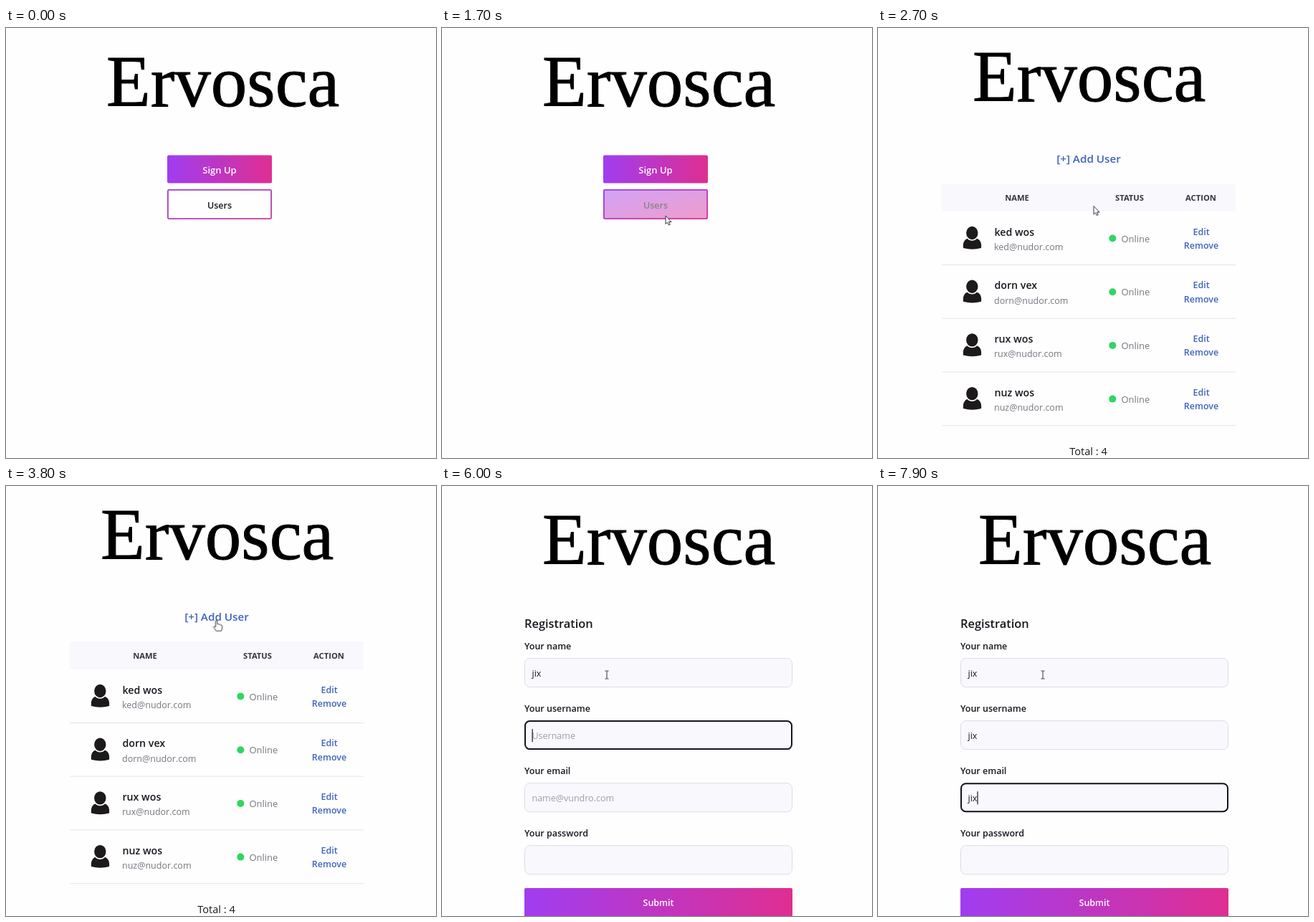
An HTML page that plays this animation: 600x600 px, repeating every 8000 ms.

```html
<!DOCTYPE html>
<html lang="en">
<head>
<meta charset="utf-8">
<title>Sign-up flow</title>
<style>
html, body { margin: 0; width: 100%; height: 100%; overflow: hidden; background: #fefefe; }
svg { display: block; width: 100vw; height: 100vh; }
text { font: 12.5px "Open Sans", "Noto Sans", sans-serif; fill: #17191f; white-space: pre; }
.mid { text-anchor: middle; }
.semi { font-weight: 600; }
.white { fill: #fff; }
.button { font-size: 13px; }
.title { font: 101px "Liberation Serif", "Noto Serif", serif; fill: #000; stroke: #000; stroke-width: .9px; }
.heading { font-size: 16.4px; font-weight: 600; }
.col { font-size: 11.2px; font-weight: 700; fill: #33363f; }
.person { font-size: 14.2px; font-weight: 600; }
.mail { fill: #74777f; }
.online { font-size: 12.9px; fill: #74777f; }
.link { font-weight: 600; fill: #3f62bd; }
.add { font-size: 15.2px; }
.total { font-size: 14.6px; }
.hint { fill: #9d9fa8; }

/* One loop is 8 s, so 1% is 80 ms. */
.home, .users, .form, .arrow, .hand, .beam { animation: home 8s step-end infinite; }
.users { animation-name: users; }
.form { animation-name: form; }
.arrow { animation-name: arrow; }
.hand { animation-name: hand; }
.beam { animation-name: beam; }
.hover { animation: hover 8s linear infinite; }
.cursor { animation: path 8s ease-in-out infinite; }
@keyframes home { 0% { opacity: 1 } 31.25%, 100% { opacity: 0 } }
@keyframes users { 0% { opacity: 0 } 31.25% { opacity: 1 } 58.75%, 100% { opacity: 0 } }
@keyframes form { 0% { opacity: 0 } 58.75%, 100% { opacity: 1 } }
@keyframes hover { 0%, 20.6% { opacity: 0 } 22%, 100% { opacity: 1 } }
@keyframes arrow {
  0% { opacity: 0 } 16.25% { opacity: 1 } 45% { opacity: 0 }
  58.75% { opacity: 1 } 63.5%, 100% { opacity: 0 }
}
@keyframes hand { 0% { opacity: 0 } 45% { opacity: 1 } 58.75%, 100% { opacity: 0 } }
@keyframes beam { 0% { opacity: 0 } 63.5%, 100% { opacity: 1 } }
@keyframes path {
  0%, 16.25% { transform: translate(296px, 302px) }
  21.25% { transform: translate(312px, 262px) }
  27.5%, 31.25% { transform: translate(319.5px, 244.5px) }
  33.75% { transform: translate(301px, 248.5px) }
  43.75% { transform: translate(294px, 191px) }
  50%, 60% { transform: translate(293.5px, 185.5px) }
  65%, 100% { transform: translate(230px, 263.5px) }
}
</style>
</head>
<body>
<svg viewBox="0 0 600 600">
  <defs>
    <linearGradient id="across">
      <stop stop-color="#a03df1"/><stop offset="1" stop-color="#df2e91"/>
    </linearGradient>
    <linearGradient id="diagonal" x2="1" y2="1">
      <stop stop-color="#a03df1"/><stop offset="1" stop-color="#df2e91"/>
    </linearGradient>
    <linearGradient id="edge" x2="1" y2="1">
      <stop stop-color="#9440d6"/><stop offset="1" stop-color="#c93a9c"/>
    </linearGradient>
    <g id="avatar" fill="#1d1a1b">
      <path d="M119 307C118 299 121 295 125.500 293.500Q131 298 137 293.500C142 295 145 299 144 307Q131.500 310.500 119 307Z"/>
      <ellipse cx="131.300" cy="286" rx="9" ry="10" stroke="#fefefe" stroke-width="1.600"/>
    </g>
  </defs>

  <g class="home">
    <text class="title" x="140" y="109">Ervosca</text>
    <rect x="225" y="177.500" width="146" height="39" rx="2" fill="url(#across)"/>
    <text class="mid semi white button" x="298" y="202.500">Sign Up</text>
    <rect x="225.900" y="225.900" width="144.200" height="40.200" rx="1.500" fill="#fefefe" stroke="url(#edge)" stroke-width="1.800"/>
    <text class="mid semi" x="298" y="251.500">Users</text>
    <g class="hover">
      <rect x="225" y="225" width="146" height="42" rx="2" fill="url(#diagonal)"/>
      <text class="mid semi white" x="298" y="251.500">Users</text>
    </g>
  </g>

  <g class="users">
    <text class="title" x="132" y="102">Ervosca</text>
    <text class="mid link add" x="294" y="187.500">[+] Add User</text>
    <rect x="89" y="217" width="410" height="39" fill="#f9f8fd"/>
    <text class="mid col" x="194" y="241">NAME</text>
    <text class="mid col" x="351" y="241">STATUS</text>
    <text class="mid col" x="450.500" y="241">ACTION</text>
    <g id="rows"></g>
    <text class="mid total" x="293.500" y="596">Total : 4</text>
  </g>

  <g class="form">
    <text class="title" x="140" y="109">Ervosca</text>
    <text class="heading" x="115" y="198">Registration</text>
    <g id="fields"></g>
    <rect x="115" y="561" width="374" height="42" rx="2" fill="url(#across)"/>
    <text class="mid semi white" x="302" y="585.500">Submit</text>
  </g>

  <g class="cursor">
    <path class="arrow" d="M0 0V11.500L2.600 9.200L4.300 13L6.200 12.200L4.500 8.500H8Z" fill="#fff" stroke="#33343a"/>
    <path class="hand" d="M-1.200 1Q0 -1 1.200 1V5.500Q3 4.500 3.600 6Q5.400 5.200 6 6.800Q8 6.500 8 8.500V11Q7.500 13 6.500 15H-.500Q-2 12 -4.500 9.500Q-4 7.500 -1.200 9.500Z" fill="#fff" stroke="#33343a"/>
    <path class="beam" d="M-2.500 -5.500H-.800L0 -5L.800 -5.500H2.500M0 -5V5M-2.500 5.500H-.800L0 5L.800 5.500H2.500" fill="none" stroke="#33343a"/>
  </g>
</svg>

<script>
const LOOP = 8000;
const WORD = "jix";
const $ = id => document.getElementById(id);

const people = ["ked wos", "dorn vex", "rux wos", "nuz wos"];
$("rows").innerHTML = people.map((name, i) => `
  <g transform="translate(0 ${i * 74.7})">
    <use href="#avatar"/>
    <text class="person" x="162.500" y="289.500">${name}</text>
    <text class="mail" x="162" y="310">${name.split(" ")[0]}@nudor.com</text>
    <circle cx="327.300" cy="293.500" r="5" fill="#31d562"/>
    <text class="online" x="339.500" y="298.500">Online</text>
    <text class="mid link" x="451" y="288.500">Edit</text>
    <text class="mid link" x="451" y="308">Remove</text>
    <path d="M89 330.500H499" stroke="#e9e9f0" stroke-width="1.300"/>
  </g>`).join("");

const fields = [
  { label: "Your name", hint: "Fullname", focus: 5200, keys: [5400, 5520, 5640] },
  { label: "Your username", hint: "Username", focus: 5900, keys: [6250, 6400, 6550] },
  { label: "Your email", hint: "name@vundro.com", focus: 7000, keys: [7450, 7600, 7750] },
  { label: "Your password", hint: "", focus: LOOP, keys: [] }
];
$("fields").innerHTML = fields.map((f, i) => `
  <g transform="translate(0 ${i * 87.1})">
    <text class="semi" x="115" y="228">${f.label}</text>
    <rect x="115.500" y="240.500" width="373" height="40" rx="7" fill="#f9f8fd" stroke="#dcdce2"/>
    <rect class="ring" x="116" y="241" width="372" height="39" rx="6.500" fill="none" stroke="#14161c" stroke-width="2"/>
    <text class="value" x="125.500" y="265.500"></text>
    <rect class="caret" y="252" width="1.200" height="18" fill="#14161c"/>
  </g>`).join("");

[...$("fields").children].forEach((group, i) => {
  const f = fields[i];
  f.ring = group.querySelector(".ring");
  f.value = group.querySelector(".value");
  f.caret = group.querySelector(".caret");
  f.blur = fields[i + 1]?.focus ?? LOOP;
});

function drawField(f, t) {
  const count = f.keys.filter(k => k <= t).length;
  const active = t >= f.focus && t < f.blur;
  const lastInput = count ? f.keys[count - 1] : f.focus;
  const caretOn = active && (t - lastInput) % 1000 < 500;
  f.value.textContent = count ? WORD.slice(0, count) : f.hint;
  f.value.classList.toggle("hint", !count);
  f.ring.style.display = active ? "" : "none";
  f.caret.style.display = caretOn ? "" : "none";
  if (caretOn) f.caret.setAttribute("x", 125.5 + (count ? f.value.getComputedTextLength() : 0));
}

let start;
function frame(now) {
  start ??= now;
  const t = (now - start) % LOOP;
  fields.forEach(f => drawField(f, t));
  requestAnimationFrame(frame);
}
requestAnimationFrame(frame);
</script>
</body>
</html>
```
